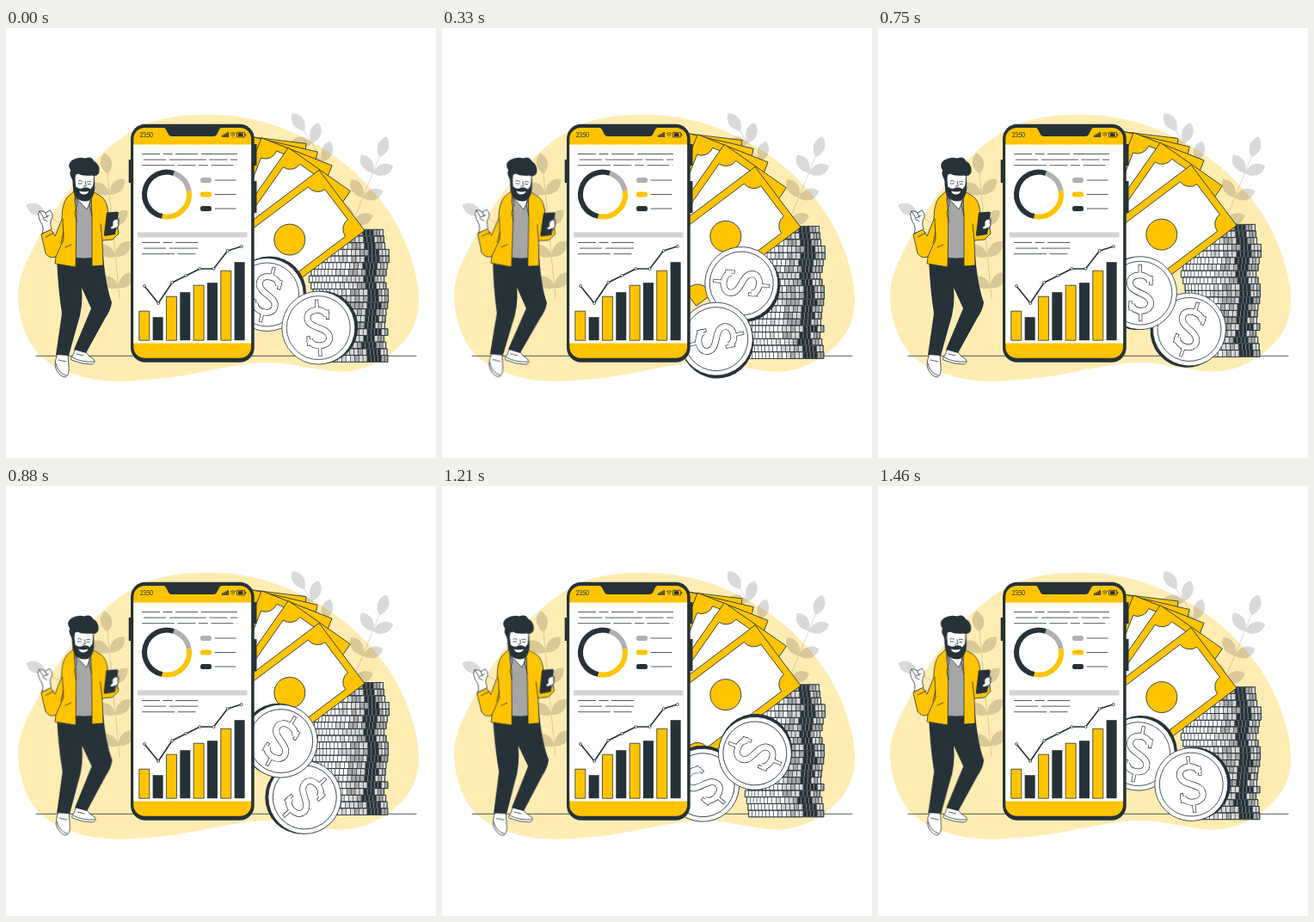
Animation, 500 px wide and 500 px high, one loop 1.5 s. Source, as an HTML page:

```html
<!DOCTYPE html>
<html lang="en">
<head>
<meta charset="utf-8">
<title>Growing revenue</title>
<style>
html, body { margin: 0; width: 100%; height: 100%; overflow: hidden; background: #fff; }
svg { display: block; width: 100%; height: 100%; }
.ln { fill: none; stroke: #263238; stroke-width: .8; stroke-linecap: round; stroke-linejoin: round; }
.y { fill: #ffc400; stroke: #263238; stroke-width: .8; stroke-linejoin: round; }
.w { fill: #fff; stroke: #263238; stroke-width: .8; stroke-linejoin: round; }
.d { fill: #263238; }
</style>
</head>
<body>
<svg viewBox="0 0 500 500">
  <path id="blob" fill="#ffecb3"/>
  <g id="plants" opacity=".15"></g>
  <path class="ln" d="M35 381.3H477"/>
  <g id="money"><g id="stack"></g><g id="notes"></g></g>
  <g id="coins"></g>

  <g id="phone">
    <path class="d" d="M142.700 153h4v27h-4zM287 135h4.500v25h-4.500zM287 178h4.500v37h-4.500z"/>
    <rect class="d" x="145" y="111.800" width="143.700" height="276.900" rx="17"/>
    <clipPath id="screen"><rect x="148.300" y="116" width="136.800" height="267.700" rx="13"/></clipPath>
    <g clip-path="url(#screen)">
      <path fill="#ffc400" d="M148 115h138v270h-138z"/>
      <path fill="#fff" d="M148 135.500h138v231h-138z"/>
      <path class="d" d="M183 115h68l-3 3-3 6q-1 2-4 2h-48q-3 0-4-2l-3-6z"/>
    </g>
    <text x="155.500" y="127.200" font-family="Lato, sans-serif" font-size="7" letter-spacing="-.6" fill="#263238">23:50</text>
    <path class="d" d="M251 127v-2.500h1.600v2.500zM253.100 127v-3.500h1.600v3.500zM255.200 127v-4.700h1.600v4.700zM257.300 127v-6h1.600v6zM270 122.300h5.500v3.600h-5.500zM278.200 123h1v2.200h-1z"/>
    <path class="ln" d="M261 122.800q3-2.500 6 0M262.200 124.500q1.800-1.500 3.600 0M263.800 126.300h.4M269 121.300h8.600v5.600h-8.600z"/>
    <g id="copy" class="ln"></g>
    <g id="donut" fill="none" stroke-width="6"></g>
    <g id="legend"></g>
    <path fill="#d3d3d3" d="M153 237.600h127.500v5.800h-127.500z"/>
    <g id="chart"></g>
  </g>

  <g id="man">
    <path class="w" d="M60 378L72 379 73 393Q74 405 68 406 60 404 57 393 57 386 60 378zM81 372L92 376Q95 381 102 385 105 390 99 391 88 391 76 386 74 384 78 380z"/>
    <path class="ln" d="M58 390Q60 401 70 404M77 383Q88 389 102 388M61 386L70 388M82 379L90 381"/>
    <path class="d" d="M59 265L113 265Q116 300 123 319 122 328 115 338L93 378 79 374 99 326 88 302Q90 325 83 345L73 381 58 380 65 332Q60 300 59 265z"/>
    <path fill="#a6a6a6" stroke="#263238" stroke-width=".7" d="M80 195L100 195 103 267Q90 269 80 267z"/>
    <path class="w" d="M82 190L83 199 94 211 99 200 100 188z"/>
    <path class="y" d="M80 189L71 197Q65 205 65 222L57 242 52 234 41 240 46 262Q51 269 58 266L57 274 81 278 82 214 80 201z"/>
    <path class="y" d="M99 189L111 196Q118 201 119 216L121 226 130 232 131 239 124 246 112 247 113 276 100 277 100 224z"/>
    <path class="ln" d="M80 190L83 204 80 215 82 225M99 190L97 206 100 218M66 222L67 246 58 266M64 250L67 238M112 247L110 228M76 252L69 255M46 243L56 238"/>
    <path class="w" d="M42 239Q45 232 40 225 36 217 39 213 43 212 46 215L51 212Q55 215 54 220 50 225 53 234z"/>
    <path class="ln" d="M39 213L44 221 50 218M46 215L48 220M43 222L48 225"/>
    <path class="w" d="M119 237Q120 224 126 220 131 219 131 223 132 231 127 236z"/>
    <path class="d" d="M117 214.500L130 213.500Q131 214 130.700 216L127 240 115 242Q113.500 241 114 239z"/>
    <path class="w" d="M124 225Q127 221 131 223L130 226 131 229 129 232 123 234 121 232 124 230z"/>
    <g transform="translate(-1.800 -.5)">
      <path class="w" d="M80 168L104 168 104 186Q102 197 93 199 82 196 80 184z"/>
      <path class="d" d="M79 172L82 173 83 185Q88 189 92 186 97 185 100 188L103 184 105 172 105 188Q103 202 94 202 83 202 80 190z"/>
      <path class="d" d="M78 175Q75 170 77 166 72 159 79 154 86 150 94 152 101 149 104 155 112 160 110 169 107 174 102 172 91 173 86 170L83 171 81 181z"/>
      <path fill="#fff" d="M87 190Q93 192 98 190 97 194 92 194 88 194 87 190z"/>
      <path class="ln" d="M86 178.500Q88.500 176.500 90.500 179M96 179.500Q98.500 177.500 101 179.500M94 179L95 184 92 184.500M86 181.500H90M97 182H100"/>
    </g>
  </g>
</svg>
<script>
const $ = id => document.getElementById(id);
const rad = a => a * Math.PI / 180;
const repeat = (n, f) => Array.from({ length: n }, (_, i) => f(i)).join('');

// smooth closed curve through a few points
function closedCurve(p) {
  const n = p.length, at = i => p[(i + n) % n];
  return 'M' + p[0] + repeat(n, i => {
    const [z, a, b, c] = [at(i - 1), at(i), at(i + 1), at(i + 2)];
    return `C${a[0] + (b[0] - z[0]) / 6} ${a[1] + (b[1] - z[1]) / 6} ${b[0] - (c[0] - a[0]) / 6} ${b[1] - (c[1] - a[1]) / 6} ${b}`;
  }) + 'z';
}
$('blob').setAttribute('d', closedCurve([
  [14, 310], [37, 246], [90, 168], [160, 113], [245, 101], [325, 118], [400, 163], [455, 230],
  [480, 310], [462, 365], [400, 399], [300, 389], [185, 407], [100, 408], [36, 377]]));

// straight twig with n pairs of leaves and one at the tip
function twig(x, y, tipX, tipY, n) {
  const dx = tipX - x, dy = tipY - y, head = Math.atan2(dx, -dy) * 180 / Math.PI;
  const leaf = (u, turn) => `<path transform="translate(${x + dx * u} ${y + dy * u}) rotate(${head + turn})" d="M0 0C-9-8-9-19-1-25 8-19 9-8 0 0z"/>`;
  return `<path stroke="#000" d="M${x} ${y}L${tipX} ${tipY}"/>` + leaf(1, 0) +
    repeat(n, i => leaf((i + .35) / n, 52) + leaf((i + .35) / n, -52));
}
$('plants').innerHTML = twig(132, 315, 118, 170, 4) + twig(399, 236, 434, 150, 3) +
  twig(374, 163, 347, 120, 2) + twig(62, 226, 46, 217, 0) + twig(418, 323, 420, 322, 0);

// stack of ridged coins seen from the side
let seed = 11;
const rnd = () => (seed = seed * 16807 % 2147483647) / 2147483647;
const shade = u => u > .69 && u < .86 ? '#263238' : u > .5 ? (rnd() < .55 ? '#a6a6a6' : '#d6d6d6') : u > .36 && rnd() < .5 ? '#d0d0d0' : '#fff';
const ridges = 20, rowH = 7.7, stackW = 87;
$('stack').innerHTML = repeat(20, r => {
  const x = 355 + (rnd() - .5) * 7, y = 234.3 + r * rowH, shift = (rnd() - .5) * .05;
  const at = i => (i / ridges - .025 * Math.sin(2 * Math.PI * i / ridges)) * stackW;
  return repeat(ridges, i => {
    const fill = shade((i + .5) / ridges + shift);
    return `<rect x="${x + at(i)}" y="${y}" width="${at(i + 1) - at(i)}" height="${rowH}" fill="${fill}" stroke="${fill === '#263238' ? '#8a9296' : '#263238'}" stroke-width=".55"/>`;
  }) + `<path class="ln" d="M${x} ${y}h${stackW}v${rowH}h-${stackW}z"/>`;
});

// banknotes fanned around one pivot
const noteW = 88, noteL = 152, edge = 8, notch = 14;
function note(turn) {
  const l = edge - noteW, r = -edge, t = edge, b = noteL - edge, q = notch;
  const arc = (x, y) => `A${q} ${q} 0 0 0 ${x} ${y}`;
  return `<g transform="rotate(${turn} 264 265) translate(417 235.500) rotate(53)">
    <rect class="y" x="${-noteW}" width="${noteW}" height="${noteL}"/>
    <path class="w" d="M${l + q} ${t}H${r - q}${arc(r, t + q)}V${b - q}${arc(r - q, b)}H${l + q}${arc(l, b - q)}V${t + q}${arc(l + q, t)}z"/>
    <circle class="y" cx="${-noteW / 2}" cy="${noteL / 2}" r="18"/></g>`;
}
$('notes').innerHTML = [-46, -40, -31.5, -18, 0].map(note).join('');

// coins: tilt turns the sign, side is where the rim shows
const sign = 'M10.500 -13C8 -24 -12 -23 -12 -12C-12 1 12 -1 12 12C12 23 -8 24 -11.500 13';
const ticks = 'M11.500 -18V-11M-12.500 18V11M0 -31V-20M0 20V31';
function coin(x, y, tilt, side) {
  const pen = (c, a, b) => `<path fill="none" stroke="${c}" stroke-width="${a}" d="${sign}"/><path stroke="${c}" stroke-width="${b}" stroke-linecap="square" d="${ticks}"/>`;
  return `<g transform="translate(${x} ${y})">
    <circle class="d" cx="${3.5 * Math.cos(rad(side))}" cy="${3.5 * Math.sin(rad(side))}" r="42.500"/>
    <circle class="w" r="42.500"/><circle class="w" r="37"/>
    <g transform="rotate(${tilt})">${pen('#263238', 7.8, 4.2)}${pen('#fff', 6.4, 2.8)}</g></g>`;
}
$('coins').innerHTML = coin(-29.8, -19.3, 14, -35) + coin(29.8, 19.3, -4, -10);

// placeholder text: one dash pattern, shifted from line to line
const copy = (x, y, w) => repeat(3, i =>
  `<path d="M${x} ${y + i * 6.6}h${w}" stroke-linecap="butt" stroke-dasharray="21 3.500 11 3.500 26 4 43 3.500" stroke-dashoffset="${i * 37}"/>`);
$('copy').innerHTML = copy(158, 146.5, 111) + copy(158, 249.5, 65);

const palette = ['#b0b0b0', '#ffc400', '#263238'];
const bounds = [-72, -9, 102, 288];
const onRing = a => `${187 + 26 * Math.cos(rad(a))} ${193.5 + 26 * Math.sin(rad(a))}`;
$('donut').innerHTML = repeat(3, i =>
  `<path stroke="${palette[i]}" d="M${onRing(bounds[i])}A26 26 0 ${+(bounds[i + 1] - bounds[i] > 180)} 1 ${onRing(bounds[i + 1])}"/>`);
$('legend').innerHTML = repeat(3, i => {
  const y = 177 + i * 16.5;
  return `<rect x="226" y="${y - 3}" width="13" height="6" rx="2.500" fill="${palette[i]}"/><path class="ln" d="M243 ${y}h24"/>`;
});

const heights = [34, 27, 51, 56, 64, 67, 81, 91];
const trend = [300, 320, 296, 288, 280, 280, 259, 254].map((y, i) => [161 + i * 16.1, y]);
$('chart').innerHTML =
  heights.map((h, i) => `<rect class="${i % 2 ? 'd' : 'y'}" x="${154.8 + i * 15.83}" y="${363.2 - h}" width="12" height="${h}"/>`).join('') +
  `<path class="ln" style="stroke-width:1.600" d="M${trend.join('L')}"/>` +
  trend.map(([x, y]) => `<circle class="w" cx="${x}" cy="${y}" r="1.500"/>`).join('');

// motion runs on a 24 fps step
const loop = 1500, frames = 36, step = loop / frames;
function draw(t) {
  const k = Math.floor((t + 4) / step) % frames, p = k / frames;
  $('coins').setAttribute('transform', `translate(333.500 329.300) rotate(${k * 10.2})`);
  $('money').setAttribute('transform', `translate(0 ${-6 * Math.sin(Math.PI * p)})`);
  $('man').setAttribute('transform', `rotate(${1.1 * Math.sin(2 * Math.PI * p)} 90 265)`);
}
const start = performance.now();
function tick() {
  draw((performance.now() - start) % loop);
  requestAnimationFrame(tick);
}
tick();
</script>
</body>
</html>
```
